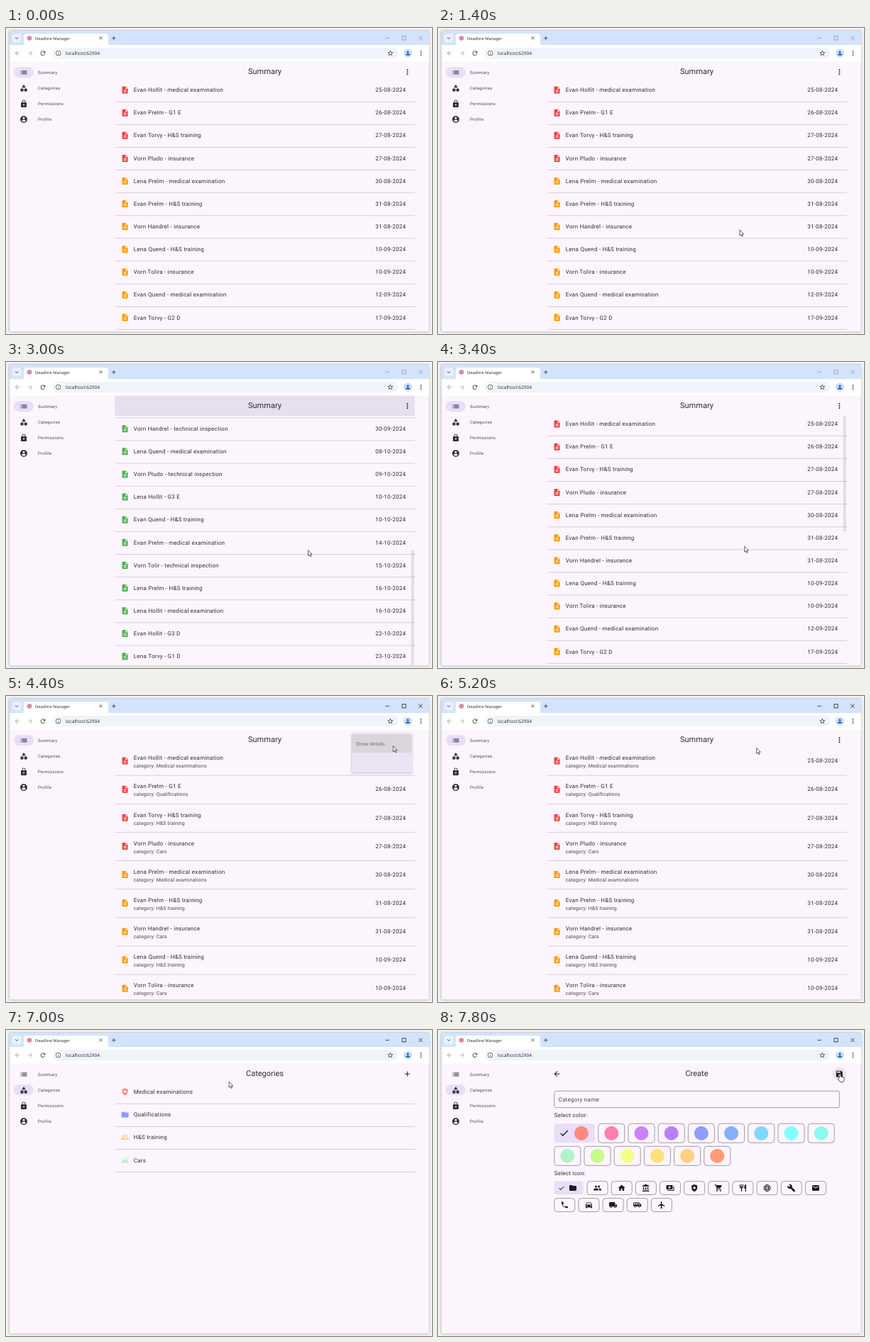
Animation of 600x432 px, one loop 8 s. Source, as an HTML page:

```html
<!DOCTYPE html>
<html lang="en">
<head>
<meta charset="utf-8">
<title>Deadline Manager</title>
<style>
  html, body { margin: 0; width: 100%; height: 100%; overflow: hidden; background: #f4f4f4; }
  svg { display: block; width: 600px; height: 432px; }
  text { font-family: Roboto, sans-serif; fill: #2c2a2f; white-space: pre; text-rendering: geometricPrecision; }
  .title { font-size: 11.04px; text-anchor: middle; }
  .body { font-size: 8.03px; letter-spacing: .25px; }
  .sub { font-size: 7.03px; letter-spacing: .125px; fill: #49454f; }
  .nav { font-size: 6.02px; letter-spacing: .25px; fill: #49454f; }
  .menu { font-size: 7.03px; letter-spacing: .05px; font-weight: 500; fill: #89848b; }
  .ui { font-family: "Open Sans", sans-serif; fill: #25282c; }
  .rule { stroke: #cac4d0; stroke-width: .8; }
  .chip { fill: none; stroke: #79747e; stroke-width: .7; }
  .on { fill: #e8def8; }
</style>
</head>
<body>
<svg id="stage" viewBox="0 0 600 432"></svg>
<script>
const LOOP = 8000, STEP = 200;
const ROW = 32.13, TALL_ROW = 40.15, FIRST_ROW = 87.3, MAX_SCROLL = 411;
const INK = '#1d1b20', SOFT = '#35323a';

const ICONS = {
  doc: 'M14 2H6c-1.1 0-2 .9-2 2v16c0 1.1.9 2 2 2h12c1.1 0 2-.9 2-2V8zm2 16H8v-2h8zm0-4H8v-2h8zm-3-5V3.5L18.5 9z',
  list: 'M3 13h2v-2H3zm0 4h2v-2H3zm0-8h2V7H3zm4 4h14v-2H7zm0 4h14v-2H7zM7 7v2h14V7z',
  category: 'M12 2l-5.5 9h11zM17.5 13a4.5 4.5 0 1 0 0 9 4.5 4.5 0 0 0 0-9zM3 13.5h8v8H3z',
  lock: 'M18 8h-1V6A5 5 0 0 0 7 6v2H6c-1.1 0-2 .9-2 2v10c0 1.1.9 2 2 2h12c1.1 0 2-.9 2-2V10c0-1.1-.9-2-2-2zm-6 9a2 2 0 1 1 0-4 2 2 0 0 1 0 4zm3.1-9H8.9V6a3.1 3.1 0 0 1 6.2 0z',
  account: 'M12 2a10 10 0 1 0 0 20 10 10 0 0 0 0-20zm0 3a3 3 0 1 1 0 6 3 3 0 0 1 0-6zm0 14.2a7.2 7.2 0 0 1-6-3.22c.03-1.99 4-3.08 6-3.08s5.97 1.09 6 3.08a7.2 7.2 0 0 1-6 3.22z',
  person: 'M12 12a4 4 0 1 0 0-8 4 4 0 0 0 0 8zm0 2c-2.67 0-8 1.34-8 4v2h16v-2c0-2.66-5.33-4-8-4z',
  more: 'M12 8a2 2 0 1 0 0-4 2 2 0 0 0 0 4zm0 2a2 2 0 1 0 0 4 2 2 0 0 0 0-4zm0 6a2 2 0 1 0 0 4 2 2 0 0 0 0-4z',
  back: 'M20 11H7.83l5.59-5.59L12 4l-8 8 8 8 1.41-1.41L7.83 13H20z',
  reload: 'M17.65 6.35A8 8 0 1 0 19.73 14h-2.08A6 6 0 1 1 12 6c1.66 0 3.14.69 4.22 1.78L13 11h7V4z',
  star: 'M22 9.24l-7.19-.62L12 2 9.19 8.63 2 9.24l5.46 4.73L5.82 21 12 17.27 18.18 21l-1.63-7.03zM12 15.4l-3.76 2.27 1-4.28-3.32-2.88 4.38-.38L12 6.1l1.71 4.04 4.38.38-3.32 2.88 1 4.28z',
  info: 'M11 17h2v-6h-2zm1-15a10 10 0 1 0 0 20 10 10 0 0 0 0-20zm0 18a8 8 0 1 1 0-16 8 8 0 0 1 0 16zM11 9h2V7h-2z',
  save: 'M17 3H5a2 2 0 0 0-2 2v14a2 2 0 0 0 2 2h14a2 2 0 0 0 2-2V7zm-5 16a3 3 0 1 1 0-6 3 3 0 0 1 0 6zm3-10H5V5h10z',
  plus: 'M19 13h-6v6h-2v-6H5v-2h6V5h2v6h6z',
  check: 'M9 16.17L4.83 12l-1.42 1.41L9 19 21 7l-1.41-1.41z',
  folder: 'M10 4H4a2 2 0 0 0-2 2v12c0 1.1.9 2 2 2h16a2 2 0 0 0 2-2V8a2 2 0 0 0-2-2h-8z',
  group: 'M16 11a3 3 0 1 0 0-6 3 3 0 0 0 0 6zm-8 0a3 3 0 1 0 0-6 3 3 0 0 0 0 6zm0 2c-2.33 0-7 1.17-7 3.5V19h14v-2.5c0-2.33-4.67-3.5-7-3.5zm8 0c-.29 0-.62.02-.97.05 1.16.84 1.97 1.97 1.97 3.45V19h6v-2.5c0-2.33-4.67-3.5-7-3.5z',
  home: 'M10 20v-6h4v6h5v-8h3L12 3 2 12h3v8z',
  bank: 'M4 10v7h3v-7zm6 0v7h3v-7zM2 22h19v-3H2zm14-12v7h3v-7zM11.5 1L2 6v2h19V6z',
  cash: 'M19 14V6a2 2 0 0 0-2-2H3a2 2 0 0 0-2 2v8c0 1.1.9 2 2 2h14a2 2 0 0 0 2-2zm-9-1a3 3 0 1 1 0-6 3 3 0 0 1 0 6zm13-6v11a2 2 0 0 1-2 2H4v-2h17V7z',
  health: 'M10.5 13H8v-3h2.5V7.5h3V10H16v3h-2.5v2.5h-3zM12 2L4 5v6.09c0 5.05 3.41 9.76 8 10.91 4.59-1.15 8-5.86 8-10.91V5z',
  cart: 'M7 18a2 2 0 1 0 0 4 2 2 0 0 0 0-4zM1 2v2h2l3.6 7.59-1.35 2.45C4.52 15.37 5.48 17 7 17h12v-2H7.42l-.22-.37.9-1.63h7.45c.75 0 1.41-.41 1.75-1.03l3.58-6.49A1 1 0 0 0 20 4H5.21l-.94-2zm16 16a2 2 0 1 0 0 4 2 2 0 0 0 0-4z',
  food: 'M11 9H9V2H7v7H5V2H3v7c0 2.12 1.66 3.84 3.75 3.97V22h2.5v-9.03C11.34 12.84 13 11.12 13 9V2h-2zm5-3v8h2.5v8H21V2c-2.76 0-5 2.24-5 4z',
  globe: 'M12 3a9 9 0 1 0 0 18 9 9 0 0 0 0-18c-5.3 5-5.3 13 0 18 5.3-5 5.3-13 0-18M4 9h16M4 15h16',
  wrench: 'M22.7 19l-9.1-9.1c.9-2.3.4-5-1.5-6.9-2-2-5-2.4-7.4-1.3L9 6 6 9 1.6 4.7C.4 7.1.9 10.1 2.9 12.1c1.9 1.9 4.6 2.4 6.9 1.5l9.1 9.1c.4.4 1 .4 1.4 0l2.3-2.3c.5-.4.5-1.1.1-1.4z',
  mail: 'M20 4H4a2 2 0 0 0-2 2v12c0 1.1.9 2 2 2h16a2 2 0 0 0 2-2V6a2 2 0 0 0-2-2zm0 4l-8 5-8-5V6l8 5 8-5z',
  phone: 'M20 15.5c-1.25 0-2.45-.2-3.57-.57a1 1 0 0 0-1.02.24l-2.2 2.2a15 15 0 0 1-6.59-6.59l2.2-2.21a1 1 0 0 0 .25-1A11.4 11.4 0 0 1 8.5 4a1 1 0 0 0-1-1H4a1 1 0 0 0-1 1 17 17 0 0 0 17 17 1 1 0 0 0 1-1v-3.5a1 1 0 0 0-1-1z',
  car: 'M18.92 6a1.5 1.5 0 0 0-1.42-1h-11a1.5 1.5 0 0 0-1.42 1L3 12v8a1 1 0 0 0 1 1h1a1 1 0 0 0 1-1v-1h12v1a1 1 0 0 0 1 1h1a1 1 0 0 0 1-1v-8zM6.5 16a1.5 1.5 0 1 1 0-3 1.5 1.5 0 0 1 0 3zm11 0a1.5 1.5 0 1 1 0-3 1.5 1.5 0 0 1 0 3zM5 11l1.5-4.5h11L19 11z',
  truck: 'M20 8h-3V4H3a2 2 0 0 0-2 2v11h2a3 3 0 0 0 6 0h6a3 3 0 0 0 6 0h2v-5zM6 18.5a1.5 1.5 0 1 1 0-3 1.5 1.5 0 0 1 0 3zm13.5-9l1.96 2.5H17V9.5zM18 18.5a1.5 1.5 0 1 1 0-3 1.5 1.5 0 0 1 0 3z',
  bus: 'M17 5H3a2 2 0 0 0-2 2v9h2a3 3 0 0 0 6 0h5.5a3 3 0 0 0 6 0H23v-5zM3 11V7h4v4zm3 6.5a1.5 1.5 0 1 1 0-3 1.5 1.5 0 0 1 0 3zm7-6.5H9V7h4zm4.5 6.5a1.5 1.5 0 1 1 0-3 1.5 1.5 0 0 1 0 3zM15 11V7h1l4 4z',
  plane: 'M21 16v-2l-8-5V3.5a1.5 1.5 0 0 0-3 0V9l-8 5v2l8-2.5V19l-2 1.5V22l3.5-1 3.5 1v-1.5L13 19v-5.5z'
};

const DEADLINES = `Evan Hollit - medical examination|25-08
Evan Prelm - G1 E|26-08
Evan Torvy - H&S training|27-08
Vorn Pludo - insurance|27-08
Lena Prelm - medical examination|30-08
Evan Prelm - H&S training|31-08
Vorn Handrel - insurance|31-08
Lena Quend - H&S training|10-09
Vorn Tolira - insurance|10-09
Evan Quend - medical examination|12-09
Evan Torvy - G2 D|17-09
Lena Prelm - G1 E|18-09
Lena Torvy - H&S training|30-09
Vorn Handrel - technical inspection|30-09
Lena Quend - medical examination|08-10
Vorn Pludo - technical inspection|09-10
Lena Hollit - G3 E|10-10
Evan Quend - H&S training|10-10
Evan Prelm - medical examination|14-10
Vorn Tolir - technical inspection|15-10
Lena Prelm - H&S training|16-10
Lena Hollit - medical examination|16-10
Evan Hollit - G3 D|22-10
Lena Torvy - G1 D|23-10`.split('\n').map(line => line.split('|'));

const SWATCHES = '#ff8a80 #ff80ab #ca82ff #b880ff #8c9eff #82b1fa #80d8ff #84ffff #8ff8f0 #b3f2c6 #c8f98c #f4ff81 #ffe17c #ffd180 #ff9a78'.split(' ');
const CHOICES = 'folder group home bank cash health cart food globe wrench mail phone car truck bus plane'.split(' ');

const text = (cls, x, y, str, extra = '') =>
  `<text class="${cls}" x="${x}" y="${y}" ${extra}>${str.replace(/&/g, '&amp;')}</text>`;
const icon = (name, x, y, fill = INK, size = 12) => {
  const paint = name === 'globe' ? `fill="none" stroke="${fill}" stroke-width="2"` : `fill="${fill}" fill-rule="evenodd"`;
  return `<path d="${ICONS[name]}" ${paint} transform="translate(${x - size / 2} ${y - size / 2}) scale(${size / 24})"/>`;
};
const rect = (x, y, w, h, fill, r = 0, extra = '') =>
  `<rect x="${x}" y="${y}" width="${w}" height="${h}" rx="${r}" fill="${fill}" ${extra}/>`;
const circle = (x, y, r, fill) => `<circle cx="${x}" cy="${y}" r="${r}" fill="${fill}"/>`;
const line = (d, color, w = .8) => `<path d="${d}" fill="none" stroke="${color}" stroke-width="${w}"/>`;
const rule = y => `<path class="rule" d="M153.5 ${y}H576"/>`;

function categoryOf(name) {
  if (name.includes('medical')) return 'Medical examinations';
  if (name.includes('H&S')) return 'H&S training';
  return / G\d/.test(name) ? 'Qualifications' : 'Cars';
}

function deadlineRows(detailed) {
  const pitch = detailed ? TALL_ROW : ROW;
  return DEADLINES.map(([name, date], i) => {
    const y = FIRST_ROW + i * pitch, mid = y + (detailed ? 4 : 0);
    const color = i < 4 ? '#e9443f' : i < 12 ? '#ff9800' : '#4caf50';
    return icon('doc', 167.6, mid + .2, color) + text('body', 179.8, y + 2.9, name) +
      (detailed ? text('sub', 179.8, y + 13.9, 'category: ' + categoryOf(name)) : '') +
      text('body', 520.2, mid + 2.9, date + '-2024') + rule(mid + (detailed ? 20.8 : 16.9));
  }).join('');
}

function categoriesPage() {
  const items = [['health', 'Medical examinations', 0], ['folder', 'Qualifications', 4], ['group', 'H&S training', 13], ['car', 'Cars', 9]];
  return text('title', 364.5, 65.3, 'Categories') + icon('plus', 565.3, 62) +
    items.map(([name, label, c], i) => {
      const y = FIRST_ROW + i * ROW;
      return icon(name, 167.6, y, SWATCHES[c]) + text('body', 179.8, y + 2.9, label) + rule(y + 16.9);
    }).join('');
}

function createPage() {
  const chip = (x, y, w, h, on) => `<rect x="${x}" y="${y}" width="${w}" height="${h}" rx="4" class="${on ? 'on' : 'chip'}"/>`;
  const colors = SWATCHES.map((color, i) => {
    const second = i > 8, y = second ? 164.3 : 132.2;
    const x = second ? 163.8 + (i - 9) * 42.2 : 183.6 + i * 42.2;
    if (!i) return chip(163.7, y, 57.2, 27, true) + icon('check', 177.7, y + 13.3, INK, 15) + circle(202, y + 13.5, 10, color);
    return chip(x, y, 37, 27) + circle(x + 18.5, y + 13.5, 10, color);
  });
  const icons = CHOICES.map((name, i) => {
    const second = i > 10, y = second ? 237.6 : 213.6;
    const x = second ? 163.8 + (i - 11) * 34.15 : 175.9 + i * 34.15;
    if (!i) return chip(163.7, y, 41, 19, true) + icon('check', 174, y + 9.5, INK, 10) + icon(name, 190, y + 9.5);
    return chip(x, y, 29, 19) + icon(name, x + 14.5, y + 9.5);
  });
  return icon('back', 167.6, 62) + text('title', 364.5, 65.3, 'Create') + icon('save', 565.3, 62) +
    '<rect class="chip" x="163.8" y="86.2" width="401.5" height="23.4" rx="2.5"/>' +
    text('body', 169.5, 100.5, 'Category name', 'style="fill:#49454f"') +
    text('body', 163.7, 123.3, 'Select color:') + colors.join('') +
    text('body', 163.7, 204.8, 'Select icon:') + icons.join('');
}

function browser() {
  return rect(5, 4, 590.8, 424.4, '#fdf5fd', 1) +
    rect(5, 4, 590.8, 21, '#d3e3fd') +
    rect(9, 8, 12.5, 12.5, '#eaf1fe', 4) + line('M13 13.2l2.2 2.2 2.2-2.2', '#333', .9) +
    '<path d="M21 25q4 0 4-4V12q0-4 4-4H140q4 0 4 4v9q0 4 4 4z" fill="#fff"/>' +
    circle(33, 14.3, 3.4, '#d38fa6') +
    text('ui', 41, 16.6, 'Deadline Manager', 'font-size="5.75"') +
    line('M131.4 12.2l4 4m0-4l-4 4', '#333') + line('M149 14.3h5.6m-2.8-2.8v5.6', '#333') +
    rect(5, 24, 590.8, 23.4, '#fff') + rect(65.5, 28, 487, 15.2, '#f0f3fa', 7.6) +
    icon('back', 16, 35.6, '#a7aaae', 10) +
    `<g transform="translate(68 0) scale(-1 1)">${icon('back', 34, 35.6, '#b5b8bc', 10)}</g>` +
    icon('reload', 52, 35.6, '#3c4043', 10) + circle(73.7, 35.6, 6, '#fff') + icon('info', 73.7, 35.6, '#3c4043', 9) +
    text('ui', 84, 38, 'localhost:62904', 'font-size="6.57"') +
    icon('star', 541.3, 35.4, '#3c4043', 10) +
    circle(566, 35.6, 6, '#c8dcfa') + icon('person', 566, 35.4, '#1558b0', 9) + icon('more', 584.5, 35.6, '#3c4043', 11) +
    '<g id="controls" fill="none" stroke-width=".8"><path d="M534.5 14.3h5.2M558 11.6h5.2v5.2h-5.2zM581.2 11.5l5.4 5.4m0-5.4l-5.4 5.4"/></g>';
}

const navItems = [['list', 'Summary'], ['category', 'Categories'], ['lock', 'Permissions'], ['account', 'Profile']];
const sidebar = rect(11, 55, 28, 15.2, '#e8def8', 7.6, 'id="selected"') +
  rect(11, 77.1, 28, 15.2, '#ebe3ec', 7.6, 'id="navHover"') +
  navItems.map(([name, label], i) => icon(name, 25, 62.7 + i * 22.1, SOFT) + text('nav', 45, 64.9 + i * 22.1, label)).join('');

const stage = document.getElementById('stage');
stage.innerHTML = `
  <defs>
    <filter id="shadow" x="-10%" y="-10%" width="120%" height="130%"><feDropShadow dx="0" dy=".6" stdDeviation="1.6" flood-opacity=".3"/></filter>
    <clipPath id="page">${rect(5, 47.4, 590.8, 381, '#000')}</clipPath>
    <clipPath id="listArea">${rect(153, 72, 424, 356.4, '#000')}</clipPath>
  </defs>
  ${rect(0, 0, 600, 432, '#f4f4f4')}
  ${rect(4.5, 3.5, 591.6, 425.1, '#bcbcbc', 1, 'filter="url(#shadow)"')}
  ${browser()}
  <g clip-path="url(#page)">
    ${sidebar}
    <g id="summary">
      <g clip-path="url(#listArea)">
        <g id="compact">${deadlineRows(false)}</g>
        <g id="detailed">${deadlineRows(true)}</g>
      </g>
      ${rect(570.7, 76, 4, 163, '#1d1b20', 0, 'id="thumb" opacity=".11"')}
      ${rect(153.5, 47.4, 422.2, 28.6, '#e7deee', 0, 'id="header"')}
      ${text('title', 364.5, 65.3, 'Summary')}${icon('more', 565.4, 62)}
    </g>
    <g id="buttonHover">${circle(565.3, 62, 10, '#eee5ee')}</g>
    <g id="categories">${categoriesPage()}</g>
    <g id="create">${createPage()}</g>
    <g id="menu">
      ${rect(487, 52.5, 84.5, 55.5, '#ece3f4', 1.5, 'filter="url(#shadow)"')}
      ${rect(487, 54.3, 84.5, 25.6, '#dad5da')}
      ${text('menu', 493, 70.3, 'Show details')}
    </g>
  </g>
  <path id="arrow" d="M0 0V8.2l1.9-1.7 1.3 2.9 1.3-.6-1.3-2.8h2.5z" fill="#fff" stroke="#222" stroke-width=".7"/>
  <path id="hand" d="M-1 5.5V.8q1-1.6 2 0v3l4 .9q1 .3 1 1.4l-.6 3.5-.9 1.8H.2l-3-4q-.4-1.6 1-1.2z" fill="#fff" stroke="#222" stroke-width=".8"/>`;

const $ = Object.fromEntries([...stage.querySelectorAll('[id]')].map(el => [el.id, el]));
const show = (el, on) => { el.style.display = on ? '' : 'none'; };

// Linear interpolation over [time, value, ...] keys.
function track(keys, t) {
  let i = keys.findIndex(k => k[0] > t);
  if (i < 0) return keys.at(-1).slice(1);
  if (!i) return keys[0].slice(1);
  const [a, b] = [keys[i - 1], keys[i]], p = (t - a[0]) / (b[0] - a[0]);
  return a.slice(1).map((v, j) => v + (b[j + 1] - v) * p);
}

const POINTER = [[600, 445, 440], [1400, 425, 285], [1800, 425, 250.5], [2400, 425, 250.5], [2800, 425.5, 265.5],
  [3000, 425.5, 265.5], [3400, 431.7, 260], [3600, 470, 200], [4000, 565, 62], [4200, 550, 69], [4400, 545.3, 70.5],
  [5000, 545.3, 70.5], [6000, 62, 84], [6600, 62, 84], [7400, 566.3, 62]];
const SCROLL = [[2000, 0], [2200, 50.5], [2400, 150], [2800, MAX_SCROLL], [3000, MAX_SCROLL], [3400, 0]];

function render(t) {
  const between = (a, b) => t >= a && t < b;
  const [x, y] = track(POINTER, t), [scroll] = track(SCROLL, t);

  const detailed = t >= 4400;
  show($.summary, t < 6400);
  show($.compact, !detailed);
  show($.detailed, detailed);
  $.compact.setAttribute('transform', `translate(0 ${-scroll})`);
  show($.header, scroll > 0);
  show($.thumb, between(2000, 3800));
  $.thumb.setAttribute('y', 76 + scroll / MAX_SCROLL * 189.5);

  show($.categories, between(6400, 7600));
  show($.create, t >= 7600);
  show($.menu, between(4200, 4600));
  show($.navHover, between(6000, 6400));
  show($.buttonHover, t === 4000 || t >= 7400);
  $.selected.setAttribute('y', t < 6400 ? 55 : 77.1);
  $.controls.setAttribute('stroke', t < 4000 ? '#8d98aa' : '#1c1c1c');

  const hand = t === 4000 || between(6000, 6800) || t >= 7400;
  for (const [el, on] of [[$.hand, hand], [$.arrow, !hand]]) {
    show(el, on);
    el.setAttribute('transform', `translate(${x} ${y})`);
  }
}

function tick() {
  render(Math.floor(performance.now() % LOOP / STEP) * STEP);
  requestAnimationFrame(tick);
}
tick();
</script>
</body>
</html>
```
